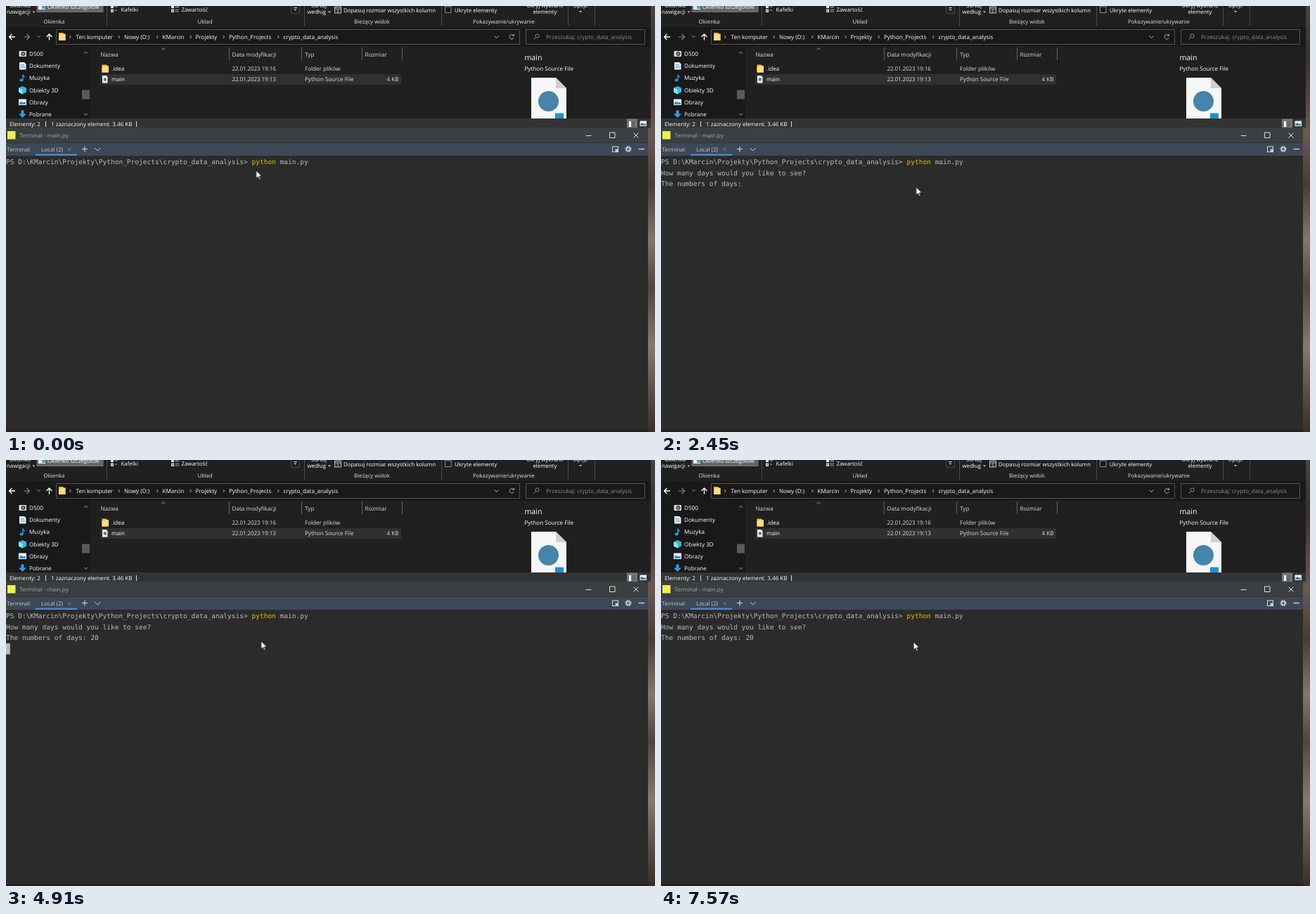
These frames come from a looping animation (923x606 px, 8000 ms). An HTML page:

```html
<!DOCTYPE html>
<html lang="pl">
<head>
<meta charset="utf-8">
<title>Terminal</title>
<style>
  html, body { margin: 0; width: 100%; height: 100%; overflow: hidden; background: #2b2b2b; }
  svg { display: block; width: 923px; height: 606px; }
  text { font: 8.1px "Open Sans", "Noto Sans", sans-serif; fill: #fff; white-space: pre; text-rendering: geometricPrecision; }
  .ribbon text { font-size: 7.87px; }
  .mid { text-anchor: middle; }
  .dim { fill: #ddd; }
  .console text { font: 9.523px "DejaVu Sans Mono", "Noto Sans Mono", monospace; fill: #bbb; }
  .console .cmd { fill: #e0bd00; }
  .line { fill: none; stroke: #ddd; stroke-width: 1; }
  .sep { fill: none; stroke: #4a4a4a; stroke-width: 1; }

  .block, .out, .d2, .d0, .mouse { animation: 8s step-end infinite; }
  .block { animation-name: block; }
  .out { animation-name: out; }
  .d2 { animation-name: two; }
  .d0 { animation-name: zero; }
  .mouse { animation-name: mouse; }

  @keyframes out { 0% { opacity: 0 } 24.375%, 100% { opacity: 1 } }
  @keyframes two { 0% { opacity: 0 } 41.5%, 100% { opacity: 1 } }
  @keyframes zero { 0% { opacity: 0 } 45.5%, 100% { opacity: 1 } }
  @keyframes block {
    0%      { opacity: 0; transform: translate(0, 229.4px) }
    3.75%   { opacity: 1; transform: translate(0, 229.4px) }
    16.375% { opacity: 0; transform: translate(0, 229.4px) }
    22.875% { opacity: 1; transform: translate(0, 229.4px) }
    24.375% { opacity: 1; transform: translate(120.4px, 245.1px) }
    30.625% { opacity: 0; transform: translate(120.4px, 245.1px) }
    37%     { opacity: 1; transform: translate(120.4px, 245.1px) }
    41.5%   { opacity: 1; transform: translate(126.1px, 245.1px) }
    45.5%   { opacity: 1; transform: translate(131.9px, 245.1px) }
    49.375% { opacity: 1; transform: translate(0, 260.9px) }
    55.125% { opacity: 0; transform: translate(0, 260.9px) }
    61.375% { opacity: 1; transform: translate(0, 260.9px) }
    67.75%  { opacity: 0; transform: translate(0, 260.9px) }
    74.875% { opacity: 1; transform: translate(0, 260.9px) }
    81.125% { opacity: 0; transform: translate(0, 260.9px) }
    87.375% { opacity: 1; transform: translate(0, 260.9px) }
    94.625%, 100% { opacity: 0; transform: translate(0, 260.9px) }
  }
  @keyframes mouse {
    0%      { transform: translate(355.3px, 233.6px) }
    16.375% { transform: translate(359.5px, 241px) }
    17.25%  { transform: translate(363.4px, 251px) }
    18.125% { transform: translate(362.5px, 254.8px) }
    23.5%   { transform: translate(362.5px, 256.2px) }
    24.375% { transform: translate(362.4px, 256.8px) }
    26.875% { transform: translate(362.4px, 257.3px) }
    62.875% { transform: translate(363.5px, 255.4px) }
    66.875% { transform: translate(362.2px, 256px) }
    67.75%  { transform: translate(360.4px, 257px) }
    68.625% { transform: translate(359.4px, 257.5px) }
    74.875% { transform: translate(359.4px, 258.1px) }
    76.5%, 100% { transform: translate(358.7px, 258.5px) }
  }
</style>
</head>
<body>
<svg viewBox="0 0 923 606">
  <defs>
    <linearGradient id="fur" x2="0" y2="1">
      <stop offset="0" stop-color="#4a4241"/><stop offset=".12" stop-color="#393231"/>
      <stop offset=".3" stop-color="#6b5a52"/><stop offset=".42" stop-color="#4a3b36"/>
      <stop offset=".55" stop-color="#85766d"/><stop offset=".66" stop-color="#54443e"/>
      <stop offset=".8" stop-color="#88786f"/><stop offset=".92" stop-color="#5a4842"/>
      <stop offset="1" stop-color="#3a2c2a"/>
    </linearGradient>
    <path id="gt" d="M-1.3-2 .7 0-1.3 2" fill="none" stroke="#ccc" stroke-width=".9"/>
    <path id="down" d="M-3-1.5 0 1.5 3-1.5" fill="none" stroke="#bbb"/>
    <path id="tri" d="M-2-1H2L0 1.2Z" fill="#ccc"/>
    <g id="folder"><path d="M0 0H6L7.5 1.5H9.5V11H0Z" fill="#e9b93f"/><path d="M1.5 2H9.5V11H0V4Z" fill="#ffdc7a"/></g>
  </defs>

  <rect width="923" height="606" fill="url(#fur)"/>
  <rect width="917" height="173" fill="#202020"/>

  <g class="ribbon">
    <path class="sep" d="M143.5 0V28M424.5 0V28M619.5 0V28M799.5 0V28M837.5 0V28"/>
    <rect x="44" y="-3" width="94" height="11.5" fill="#666" stroke="#7d7d7d" stroke-width=".8"/>
    <rect x="46" y="-2" width="10" height="7" fill="#e8eef2"/><rect x="51" y="-2" width="5" height="6" fill="#4aa3dc"/>
    <text x="5" y="2.4">Okienko</text>
    <text x="1" y="10.6">nawigacji</text><use href="#tri" x="39.5" y="8.5"/>
    <text x="59" y="4">Okienko szczegółów</text>
    <text class="mid dim" x="68.5" y="25">Okienka</text>

    <g fill="#e4e4e4"><rect x="149" y="-1" width="4" height="4"/><rect x="149" y="4.5" width="4" height="4.5"/><rect x="235" y="-1" width="4" height="4"/><rect x="235" y="4.5" width="4" height="4.5"/></g>
    <path d="M154.500 1H159M154.500 6H158M240.500 0H246M240.500 2H246M240.500 5.500H246M240.500 8H246" stroke="#aaa"/>
    <rect x="150" y="5.500" width="2" height="2.500" fill="#3d9be0"/><rect x="236" y="5.500" width="2" height="2.500" fill="#3d9be0"/>
    <text x="163.500" y="7.500">Kafelki</text>
    <text x="249.500" y="7.500">Zawartość</text>
    <path class="sep" d="M405.500 0V10.500H417.500V0"/>
    <path d="M409 2.500H414" stroke="#ccc"/><use href="#tri" x="411.500" y="5.500"/>
    <text class="mid dim" x="283" y="25">Układ</text>

    <text class="mid" x="445" y="2.400">Sortuj</text>
    <text x="428.500" y="10.600">według</text><use href="#tri" x="460" y="8.500"/>
    <rect x="467.500" y="1.500" width="9" height="8.500" fill="#333" stroke="#ccc" stroke-width=".9"/>
    <path d="M467.500 4H476.500M472 4V10" stroke="#ccc" stroke-width=".8"/><path d="M468-.5H477" stroke="#3d9be0" stroke-width="1.500"/>
    <text x="480" y="8.800">Dopasuj rozmiar wszystkich kolumn</text>
    <text class="mid dim" x="520.500" y="25">Bieżący widok</text>

    <rect x="624.500" y="1" width="8.500" height="8.500" fill="#191919" stroke="#999" stroke-width=".9"/>
    <text x="638" y="8.800">Ukryte elementy</text>
    <text class="mid" x="766.500" y="2.400">Ukryj wybrane</text>
    <text class="mid" x="766.500" y="10.600">elementy</text>
    <text class="mid dim" x="708" y="25">Pokazywanie/ukrywanie</text>
    <text class="mid" x="817" y="2.400">Opcje</text><use href="#tri" x="817" y="8"/>
  </g>

  <rect y="30" width="917" height="28" fill="#191919"/>
  <g class="line">
    <path d="M13 44H4.500M8.500 40 4.500 44 8.500 48" stroke="#fff" stroke-width="1.300"/>
    <path d="M25 44H33.500M29.500 40 33.500 44 29.500 48" stroke="#858585" stroke-width="1.200"/>
    <path d="M61.500 48.500V40M57.500 44 61.500 40 65.500 44" stroke="#fff" stroke-width="1.300"/>
    <path d="M71.500 33.500H730.500V54.500H71.500ZM739.500 33.500H908.500V54.500H739.500Z" stroke="#535353"/>
    <path d="M722 42A3.200 3.200 0 1 0 722.300 45.200M722.500 39.800V42.300H720" stroke="#aaa"/>
    <circle cx="755.500" cy="42.500" r="2.600" stroke="#999" stroke-width=".9"/><path d="M753.500 44.500 750.500 47.500" stroke="#999"/>
  </g>
  <use href="#down" transform="translate(46.500 43.500) scale(.8)"/>
  <use href="#down" x="697.500" y="44"/>
  <use href="#folder" x="75" y="38"/>
  <use href="#gt" x="91.500" y="44"/><use href="#gt" x="161" y="44"/><use href="#gt" x="215.500" y="44"/>
  <use href="#gt" x="263" y="44"/><use href="#gt" x="310" y="44"/><use href="#gt" x="387.500" y="44"/>
  <text x="99.500" y="46.600">Ten komputer</text>
  <text x="168" y="46.600">Nowy (D:)</text>
  <text x="222.500" y="46.600">KMarcin</text>
  <text x="269.500" y="46.600">Projekty</text>
  <text x="317" y="46.600">Python_Projects</text>
  <text x="394.500" y="46.600">crypto_data_analysis</text>
  <text x="768" y="46.600" style="fill:#8c8c8c">Przeszukaj: crypto_data_analysis</text>

  <rect y="58" width="120" height="102" fill="#191919"/>
  <g>
    <rect x="18.500" y="64" width="10.500" height="8" rx="1" fill="#ddd"/><circle cx="24.500" cy="68" r="3" fill="#333"/><circle cx="24.500" cy="68" r="1.500" fill="#aaa"/>
    <path d="M19 80H26L28.500 82.500V90.500H19Z" fill="#eef3f7"/><path d="M20.500 83.500H26M20.500 85.500H27M20.500 87.500H27" stroke="#4aa3dc" stroke-width=".9"/>
    <ellipse cx="22" cy="105.500" rx="2.500" ry="2" fill="#1d9bf0"/><path d="M24 105.500V97.500Q24.500 100 27 101.500" fill="none" stroke="#1d9bf0" stroke-width="1.400"/>
    <path d="M23.500 114 29 116.500V122.500L23.500 125.500 18 122.500V116.500Z" fill="#35b8dc"/><path d="M18 116.500 23.500 119V125.500L18 122.500Z" fill="#8fe3f5"/>
    <rect x="18" y="132.500" width="11" height="8.500" fill="#e9f2f8"/><path d="M19 140V137.500L22 135.500 24.500 137.500 26.500 136.500 28 138V140Z" fill="#3c8fd0"/>
    <path d="M21.500 148.500H25.500V153.500H29L23.500 159 18 153.500H21.500Z" fill="#2d9cf0"/>
  </g>
  <text x="33" y="71">D500</text>
  <text x="33" y="88.200">Dokumenty</text>
  <text x="33" y="105.400">Muzyka</text>
  <text x="33" y="122.600">Obiekty 3D</text>
  <text x="33" y="139.800">Obrazy</text>
  <text x="33" y="157">Pobrane</text>
  <use href="#down" transform="translate(113.500 66.500) scale(.85 -.85)"/>
  <use href="#down" transform="translate(113.500 154) scale(.85)"/>
  <rect x="108" y="119.500" width="11" height="13" fill="#5a5a5a"/>

  <rect x="134" y="97" width="428" height="15" fill="#303030"/>
  <path class="sep" style="stroke:#636363" d="M317.500 59V77M420.500 59V77M506.500 59V77M563.500 59V77"/>
  <use href="#down" transform="translate(224 61) scale(.85 -.85)"/>
  <text class="dim" x="134.500" y="72">Nazwa</text>
  <text class="dim" x="321.500" y="72">Data modyfikacji</text>
  <text class="dim" x="425" y="72">Typ</text>
  <text class="dim" x="510.500" y="72">Rozmiar</text>
  <use href="#folder" x="136.500" y="83.500"/>
  <path d="M137 99H142.500L144.500 101V109.500H137Z" fill="#f2f2f2"/><circle cx="140.800" cy="104.500" r="2.200" fill="#3f7ba5"/>
  <text x="150" y="92.200">.idea</text>
  <text x="150" y="107.400">main</text>
  <g style="letter-spacing:-.12px">
    <text class="dim" x="321.500" y="92.200">22.01.2023 19:16</text>
    <text class="dim" x="321.500" y="107.400">22.01.2023 19:13</text>
  </g>
  <text class="dim" x="425" y="92.200">Folder plików</text>
  <text class="dim" x="425" y="107.400">Python Source File</text>
  <text class="dim" x="558.500" y="107.400" text-anchor="end">4 KB</text>

  <text x="737.500" y="76.700" style="font-size:10.600px">main</text>
  <text x="737.500" y="91.800">Python Source File</text>
  <path d="M747 102H782L797 117V160H747Z" fill="#f7f7f7"/><path d="M782 102V117H797Z" fill="#cfcfcf"/>
  <circle cx="771.500" cy="135.500" r="14.500" fill="#4584ab"/>
  <rect x="781" y="152.500" width="12" height="8" fill="#1f8fd6"/>

  <rect y="160" width="917" height="13" fill="#333"/>
  <text x="5" y="171">Elementy: 2</text>
  <text x="64" y="171">1 zaznaczony element. 3.46 KB</text>
  <path d="M56.500 164V172M185.500 164V172" stroke="#ddd"/>
  <rect x="883" y="160.500" width="15" height="13" fill="#777"/>
  <path d="M886 164H889V172H886Z" fill="#fff"/><path d="M890.500 165H895M890.500 168H895M890.500 171H895" stroke="#444"/>
  <rect x="901.500" y="163.500" width="9.500" height="7.500" fill="#f0f0f0"/><path d="M902.500 170V167.500L905 166 907.500 168 910 167V170Z" fill="#3c78a8"/>

  <rect y="173" width="913" height="22" fill="#3c3f41"/>
  <rect x="2" y="178" width="11.500" height="11.500" fill="#eef04e"/>
  <text x="19" y="187.200" style="fill:#a4a6a8">Terminal - main.py</text>
  <path class="line" stroke-width=".9" d="M824.500 184.500H832.500M858.500 180H866V187.500H858.500ZM892.500 180.500 899.500 187.500M899.500 180.500 892.500 187.500"/>

  <rect y="194.500" width="913" height="18.500" fill="#3c4856"/>
  <rect y="194" width="913" height="1" fill="#323537"/>
  <text x="1.500" y="207" style="font-size:7.850px;fill:#c8c8c8">Terminal:</text>
  <text x="50" y="207" style="fill:#c8c8c8">Local (2)</text>
  <rect x="42" y="210.500" width="59" height="2.500" fill="#4a88c7"/>
  <path d="M88 202 92.500 206.500M92.500 202 88 206.500" stroke="#7f8790" stroke-width=".9"/>
  <path class="line" d="M108 203.500H116M112 199.500V207.500" stroke-width="1.200"/>
  <path class="line" d="M126.500 202 130.500 206 134.500 202" stroke-width="1.200"/>
  <rect class="line" x="862.500" y="200" width="8" height="7.500"/><rect x="866.500" y="203.500" width="4" height="4" fill="#ccc"/>
  <circle cx="885" cy="203.500" r="3.700" fill="none" stroke="#ccc" stroke-width="1.800" stroke-dasharray="1.600 1.306"/>
  <circle cx="885" cy="203.500" r="2.400" fill="none" stroke="#ccc" stroke-width="1.600"/>
  <path d="M899.500 203.500H908" stroke="#ddd" stroke-width="1.300"/>

  <rect y="213" width="913" height="390" fill="#2b2b2b"/>
  <rect y="603" width="914" height="3" fill="#2a1f20"/>

  <g class="console">
    <text y="225">PS D:\KMarcin\Projekty\Python_Projects\crypto_data_analysis&gt; <tspan class="cmd">python</tspan> main.py</text>
    <g class="out">
      <text y="240.700">How many days would you like to see?</text>
      <text y="256.400">The numbers of days:</text>
    </g>
    <text class="d2" x="120.400" y="256.400">2</text>
    <text class="d0" x="126.100" y="256.400">0</text>
    <rect class="block" width="5.800" height="15.600" fill="#bbb"/>
  </g>

  <path class="mouse" d="M.4.400V11.600L3.100 9.100 4.900 13.200 6.600 12.400 4.800 8.500H8.400Z" fill="#fff" stroke="#111" stroke-width=".7"/>
</svg>
</body>
</html>
```
